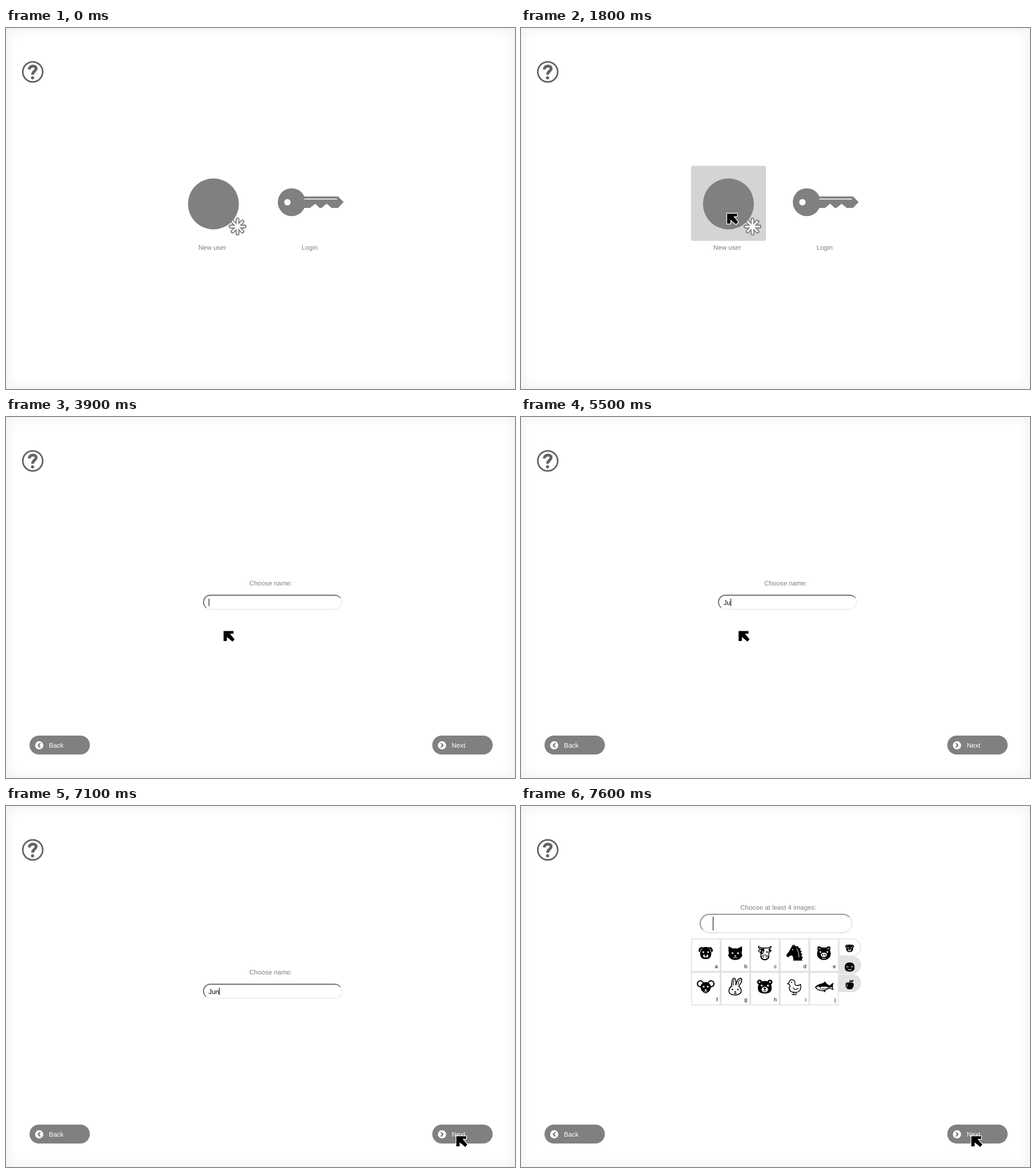
An HTML page for the animation above (8000 ms loop, 889 by 630 pixels).

```html
<!DOCTYPE html>
<html lang="en">
<head>
<meta charset="utf-8">
<title>Sign up</title>
<style>
html, body { margin: 0; width: 100%; height: 100%; overflow: hidden; background: #fff; }
#stage { position: relative; width: 889px; height: 630px; overflow: hidden; background: #fff; }
#shade { position: absolute; inset: 0; box-shadow: inset 0 0 17px 5px rgba(0,0,0,.055); }
svg { position: absolute; left: 0; top: 0; display: block; }
text { font: 11.5px "Liberation Sans", Arial, sans-serif; fill: #808080; text-rendering: geometricPrecision; white-space: pre; }
.field { position: absolute; box-sizing: border-box; border-style: solid; border-width: 2px 1px 1px 2px; background: #fff; }
#nameField { left: 344px; top: 310px; width: 243px; height: 26px; border-radius: 13px; border-color: #767676 #e6e6e6 #e6e6e6 #767676; }
#passField { left: 312px; top: 188px; width: 267px; height: 34px; border-radius: 17px; border-width: 2px; border-color: #999 #e6e6e6 #e6e6e6 #999; }
</style>
</head>
<body>
<div id="stage">
  <div id="shade"></div>
  <div id="nameField" class="field"></div>
  <div id="passField" class="field"></div>
  <svg width="889" height="630" viewBox="0 0 889 630">
    <g id="help" fill="none" stroke="#636265">
      <circle cx="46.7" cy="76.6" r="17.4" stroke-width="2.8"/>
      <path d="M40.6 72.4C41 64.6 53 64.8 52.6 71.2C52.3 75.6 46.4 75.4 46.4 81.6" stroke-width="5"/>
      <circle cx="46.4" cy="87" r="2.8" fill="#636265" stroke="none"/>
    </g>

    <g id="menu">
      <rect id="hover" x="297" y="240.5" width="131" height="131" rx="4" fill="#d4d4d4"/>
      <circle cx="362.3" cy="307" r="44.5" fill="#808080"/>
      <g id="badge" stroke-linecap="round"></g>
      <path fill="#808080" d="M515 294H580L589.7 303.8L580 314H569L560 306.8L551 314H548L540 306.8L531 314H515Z"/>
      <circle cx="499" cy="304" r="24.3" fill="#808080"/>
      <circle cx="491.5" cy="304" r="5.6" fill="#fff"/>
      <path d="M521 298.4H578" stroke="#fff" stroke-width="1.5"/>
      <text x="360.3" y="387" text-anchor="middle">New user</text>
      <text x="530.4" y="387" text-anchor="middle">Login</text>
    </g>

    <g id="nav"></g>

    <g id="nameStep">
      <text x="462.3" y="293.5" text-anchor="middle">Choose name:</text>
      <text id="typed" x="353.7" y="327.5" style="fill:#000"></text>
      <rect id="caret" y="317" width="1" height="13"/>
    </g>

    <g id="passStep">
      <text x="449.5" y="181.2" text-anchor="middle">Choose at least 4 images:</text>
      <rect x="335" y="193" width="1" height="24"/>
      <g id="grid"></g>
    </g>

    <path id="cursor" stroke="#fff" stroke-width="2.4" stroke-linejoin="round" paint-order="stroke"
      d="M0 0H17.3V4.8H11L19.2 14.6L15.6 18.6L5.8 10.6V16.6L4.8 17.6H0Z"/>
  </svg>
</div>
<script>
const LOOP = 8000, TICK = 100, NAME = 'Jun';
const $ = id => document.getElementById(id);
const circle = (x, y, r, fill = '#fff') => `<circle cx="${x}" cy="${y}" r="${r}" fill="${fill}"/>`;
const pair = (x, y, r, fill) => circle(-x, y, r, fill) + circle(x, y, r, fill);
const oval = (x, y, rx, ry, fill = '#fff') => `<ellipse cx="${x}" cy="${y}" rx="${rx}" ry="${ry}" fill="${fill}"/>`;
const solid = (d, fill = '#000') => `<path d="${d}" fill="${fill}"/>`;
const line = (d, w = 1.5, color = '#000', fill = 'none') =>
  `<path d="${d}" fill="${fill}" stroke="${color}" stroke-width="${w}" stroke-linejoin="round" stroke-linecap="round"/>`;
const place = (x, y, art, s = 1) => `<g transform="translate(${x} ${y}) scale(${s})">${art}</g>`;

const icons = {
  dog: solid('M-12.4-3.5C-13-9-8-12-5.2-10Q0-11.5 5.2-10C8-12 13-9 12.4-3.5Q11-1.5 9.6-2Q11 10.5 0 10.5Q-11 10.5-9.6-2Q-11-1.5-12.4-3.5Z')
    + line('M-9.3-2.5Q-9-6-6.5-8M9.3-2.5Q9-6 6.5-8', 1, '#fff')
    + pair(4.2, -1.8, 1.5) + oval(0, 4.8, 4.4, 3.4) + oval(0, 3, 2.7, 1.8, '#000') + line('M0 4V6.5M-2 7Q0 8 2 7', 1),
  cat: solid('M-11.5-12L-4-8Q0-9 4-8L11.5-12Q12.5-5 11 0L12.5 4Q9 12 0 12Q-9 12-12.5 4L-11 0Q-12.5-5-11.5-12Z')
    + pair(4.8, 0, 1.6) + solid('M-2 4H2L0 6.2Z', '#fff') + line('M-3 8.2Q-1 9 0 6.5Q1 9 3 8.2', 1, '#fff'),
  cow: line('M-7-7Q-11-7-11-12Q-8-9-5-9H5Q8-9 11-12Q11-7 7-7L11-5Q10-1 7-2V4Q8 11 0 12Q-8 11-7 4V-2Q-10-1-11-5Z', 1.4, '#000', '#fff')
    + solid('M-7-8H-1Q0 0-5 2L-7 1ZM7-2L11-5L7-7Z') + circle(-3.8, -2, 1.3) + circle(3.8, -2, 1.4, '#000')
    + oval(0, 7, 6.5, 4.4, '#000') + oval(0, 7, 5.2, 3.2) + pair(2.5, 6.5, 1.1, '#000'),
  horse: solid('M-1-16L2-12Q7-13 8-9L11-8L10-5L13-3L11-1L14 2L12 4L15 8L13 10L14 13H-2Q-1 7-4 4Q-8 4-10 7Q-14 7-14 3Q-8-4-6-9L-4-12L-3-15L-1-12Z')
    + circle(-3, -6, 1) + line('M4-8Q8-3 8 7', 1, '#fff'),
  pig: solid('M-11-11Q-7-13-4-9.5Q0-10.5 4-9.5Q7-13 11-11Q12-7 10.5-5Q13 0 11 6Q7 12 0 12Q-7 12-11 6Q-13 0-10.5-5Q-12-7-11-11Z')
    + line('M-9.5-8.5L-6-7M9.5-8.5L6-7', 1, '#fff') + pair(6, -2, 1.5) + oval(0, 3, 5.2, 3.8) + pair(2, 3, 1.2, '#000') + line('M-3 8.8Q0 10 3 8.8', 1, '#fff'),
  mouse: pair(9.3, -5, 6.2, '#000') + pair(9.3, -5, 4, '#fff') + solid('M-9-1Q-7-8 0-8Q7-8 9-1Q10 8 0 12Q-10 8-9-1Z')
    + pair(3.6, 0, 1.5) + circle(0, 6, 1.6) + line('M-2.5 8.8Q0 10 2.5 8.8', 1, '#fff'),
  rabbit: line('M-6-1Q-7-13-2-15Q2-14 1-3Q4-15 10-15Q14-10 6-1Q12 4 10 10Q6 15-1 14.5Q-11 14-11 8Q-11 2-6-1Z', 1.6, '#000', '#fff')
    + line('M-3-3Q-4-10-2-12M5-4Q6-11 9-12', 1.2) + circle(-5, 5, 1.3, '#000') + circle(4.5, 5, 1.3, '#000') + line('M-1 8L0 9L1 8M0 9V11M-2.5 11.5Q0 12.5 2.5 11.5', 1.2),
  bear: pair(9, -8, 4.4, '#000') + pair(9, -8, 1.5, '#fff') + solid('M-12 1Q-11-10 0-10Q11-10 12 1Q13 12 0 12Q-13 12-12 1Z')
    + pair(5.5, -2, 1.6) + oval(0, 5, 5.6, 4.8) + oval(0, 3, 2.4, 1.6, '#000') + line('M0 4V6.5M-2.5 7Q0 8.6 2.5 7', 1),
  chick: line('M-12-5L-9-7Q-9-12-4-12Q2-12 1-5Q1-2 5-2Q9-2 11-4Q13 10 1 10Q-9 10-9 2Q-6-1-9-4Z', 1.4, '#000', '#fff')
    + circle(-5, -7.5, 1.1, '#000') + line('M-2 2Q0 7 7 3M-1 10V14H-4M3 10V14H0', 1.3),
  fish: line('M-15 1Q-7-7 4-5L10-1L16-6Q14 0 16 5L10 2Q0 10-11 5Z', 1.4, '#000', '#fff')
    + solid('M-15 1Q-7-7 4-5L10-1L16-6Q14 0 15 1L9 1Q0-1-8 1ZM-3-5L2-9L5-5ZM-2 7L2 10L3 6Z') + circle(-10, 0, 1) + line('M-7-1Q-4 2-7 5M-4 4Q3 5 9 1.5', 1),
  face: solid('M-8.5 1Q-9-8 0-8Q9-8 8.5 1Q9 8 0 8Q-9 8-8.5 1Z')
    + line('M-5.5 0Q-4-1.6-2.5 0M2.5 0Q4-1.6 5.5 0M-3 4Q0 6 3 4', 1.1, '#fff'),
  apple: solid('M0-3Q4-6 7-2Q8 4 3 8Q0 7-3 8Q-8 4-7-2Q-4-6 0-3Z') + line('M0-3Q0-6 1-8', 1.4) + solid('M1-5Q3-9 7-8Q6-4 1-5Z') + line('M-4.6-1Q-5.5 1-4.4 3', 1, '#fff')
};

function build() {
  const rays = (w, color, r) => Array.from({ length: 8 }, (_, i) => {
    const a = i * Math.PI / 4;
    return `<path d="M404.3 346.5l${r * Math.cos(a)} ${r * Math.sin(a)}" stroke="${color}" stroke-width="${w}"/>`;
  }).join('');
  $('badge').innerHTML = rays(6.8, '#808080', 12.2) + circle(404.3, 346.5, 8, '#808080') + rays(3.1, '#fff', 12) + circle(404.3, 346.5, 3.5);

  const button = (x, label, dir) => `<rect x="${x}" y="556" width="105.5" height="33" rx="16.5" fill="#808080"/>`
    + circle(x + 17, 573, 7.2) + line(`M${x + 17 - dir * 1.4} 569.8l${dir * 3.1} 3.2l${-dir * 3.1} 3.2`, 1.8, '#666')
    + `<text x="${x + 34}" y="577" style="fill:#fff">${label}</text>`;
  $('nav').innerHTML = button(41, 'Back', -1) + button(744.5, 'Next', 1);

  let grid = '<rect x="297" y="231" width="258" height="117" fill="#e2e2e2"/>';
  ['dog', 'cat', 'cow', 'horse', 'pig', 'mouse', 'rabbit', 'bear', 'chick', 'fish'].forEach((kind, i) => {
    const x = 297 + i % 5 * 51.6, y = 231 + (i > 4 ? 58.5 : 0);
    grid += `<rect x="${x + 1.7}" y="${y + 1.7}" width="48.4" height="55.1" fill="#fff"/>`
      + place(x + 25.6, y + 25.8, icons[kind])
      + `<text x="${x + 46.5}" y="${y + 51.5}" text-anchor="end" style="font-size:9.2px;fill:#000">${'abcdefghij'[i]}</text>`;
  });
  const tab = y => `M555 ${y}H578.5a15 15 0 0 1 0 31H555Z`;
  grid += solid(tab(262), '#e2e2e2') + solid(tab(293.8), '#e2e2e2')
    + line('M555.5 231.8H578.5a14.5 14.5 0 0 1 0 29.6H555.5Z', 1.5, '#e2e2e2', '#fff')
    + place(574, 248.5, icons.dog, .62) + place(574, 281, icons.face) + place(574, 312, icons.apple);
  $('grid').innerHTML = grid;
}

// start time, number of steps, end point
const moves = [[1300, 1, 530, 306], [1400, 1, 418, 318], [1700, 2, 360, 324],
  [3700, 3, 380, 373.5], [6100, 4, 584, 463.3], [6600, 6, 786.5, 576.3]];
const caretOn = [[2600, 3200], [3800, 4400], [4800, 5400], [5500, 6300], [6900, 7500]];
const keyTimes = [4800, 5500, 5700];

function pointer(t) {
  let x = 0, y = 0;
  for (const [start, steps, ex, ey] of moves) {
    if (t < start) break;
    const p = Math.min(1, ((t - start) / TICK + 1) / steps), e = p * p * (3 - 2 * p);
    x += (ex - x) * e;
    y += (ey - y) * e;
  }
  return `translate(${x} ${y})`;
}

const show = (id, on) => { $(id).style.display = on ? '' : 'none'; };

function draw(now) {
  const t = Math.floor(now % LOOP / TICK) * TICK;
  const menu = t < 2600, pass = t >= 7600, naming = !menu && !pass;
  show('menu', menu);
  show('hover', t >= 1400);
  show('nav', !menu);
  show('nameStep', naming);
  show('nameField', naming);
  show('passStep', pass);
  show('passField', pass);
  show('cursor', t >= 1300);
  $('cursor').setAttribute('transform', pointer(t));
  if (naming) {
    const typed = $('typed');
    typed.textContent = NAME.slice(0, keyTimes.filter(k => t >= k).length);
    const width = typed.textContent ? typed.getComputedTextLength() : 0;
    $('caret').setAttribute('x', Math.round(353.7 + width));
    show('caret', caretOn.some(([a, b]) => t >= a && t < b));
  }
}

function frame() {
  draw(performance.now());
  requestAnimationFrame(frame);
}
build();
frame();
</script>
</body>
</html>
```
